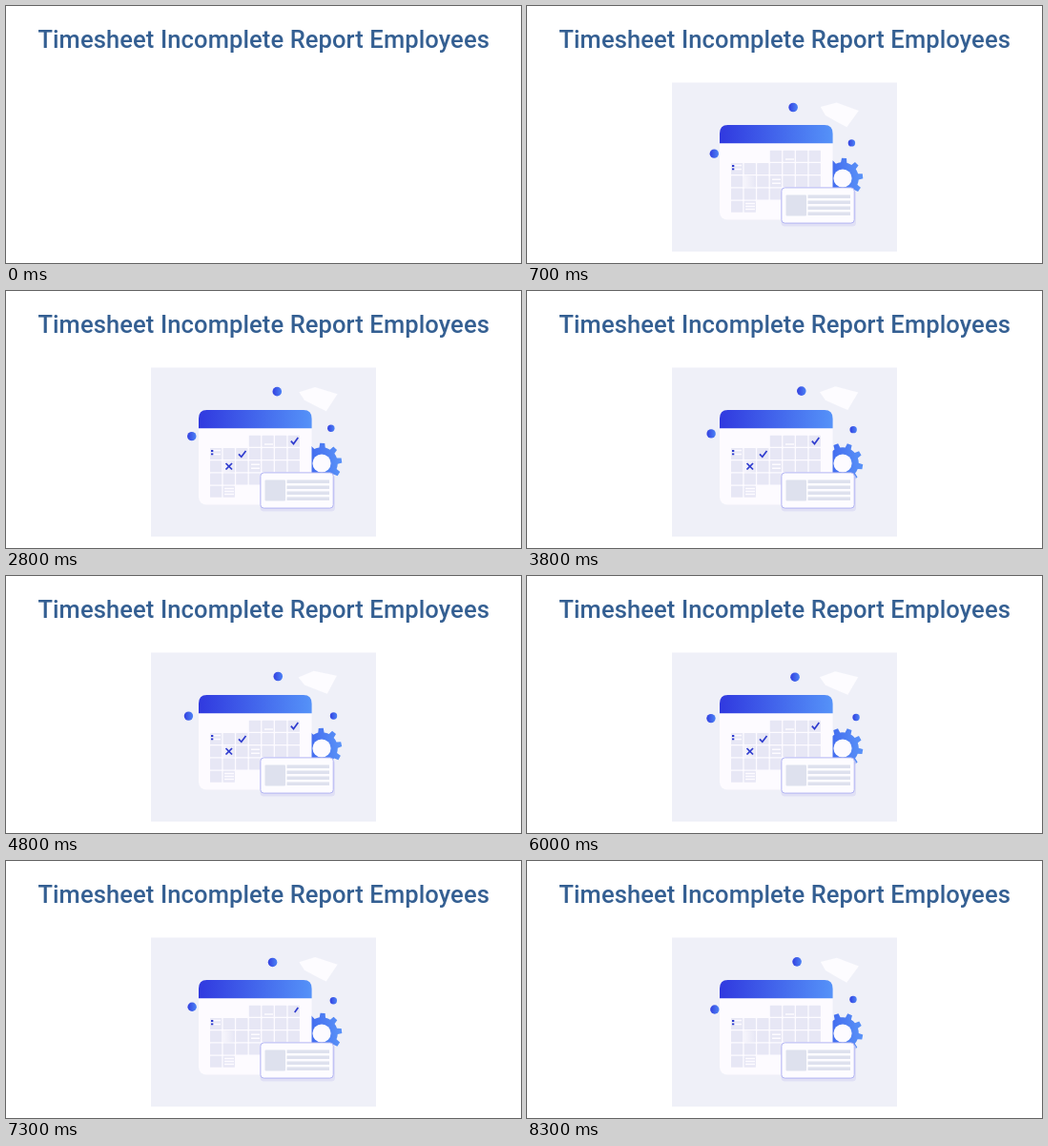
Write an HTML page that moves like this. It is 540 px wide and 270 px high and loops after 8400 ms.

```html
<!DOCTYPE html>
<html lang="en">
<head>
<meta charset="utf-8">
<title>Timesheet Incomplete Report Employees</title>
<style>
  html, body { margin: 0; width: 100%; height: 100%; overflow: hidden; background: #fff; }
  svg { display: block; width: 540px; height: 270px; }
  .title { font: 500 25.5px Roboto, "Open Sans", sans-serif; letter-spacing: .11px; fill: #345f92; text-anchor: middle; }
  .mark path { fill: none; stroke: #2f3ccf; stroke-width: 1.7; stroke-dasharray: 1 2; }
</style>
</head>
<body>
<svg viewBox="0 0 540 270">
  <defs>
    <linearGradient id="bar"><stop stop-color="#3039df"/><stop offset="1" stop-color="#5592f8"/></linearGradient>
    <linearGradient id="ball"><stop stop-color="#3340e0"/><stop offset="1" stop-color="#4d83f5"/></linearGradient>
    <linearGradient id="steel" gradientUnits="userSpaceOnUse" x1="314" x2="352" y1="0" y2="0">
      <stop stop-color="#3f66ed"/><stop offset="1" stop-color="#5a93f8"/>
    </linearGradient>
    <linearGradient id="fade"><stop stop-color="#f6f5fc"/><stop offset="1" stop-color="#e7e7f5"/></linearGradient>
  </defs>
  <text class="title" x="270.2" y="43.5">Timesheet Incomplete Report Employees</text>
  <g id="scene">
    <rect x="152" y="80.5" width="236" height="177.5" fill="#eff0f8"/>
    <path id="plane" d="M308 106L325 102L348 111L335 128L327 123.5L313 115Z" fill="#fdfcff"/>
    <g fill="url(#ball)">
      <circle id="top" r="4.8"/>
      <circle id="left" r="4.7"/>
      <circle id="right" r="3.7"/>
    </g>
    <path id="gear" fill="url(#steel)"/>
    <circle cx="331" cy="181" r="9.6" fill="#fdfbff"/>

    <rect x="202" y="126" width="118.5" height="98.5" rx="8" fill="#fdfbff"/>
    <path d="M202 144.2V134Q202 125 210.5 125H312Q320.6 125 320.6 134V144.2Z" fill="url(#bar)"/>
    <g id="cells" fill="#e7e7f5"></g>
    <rect x="227.6" y="178.3" width="12.3" height="12" fill="url(#fade)"/>
    <path d="M271 161H280M217 167.5H225M217 171.5H225M257 182.3H266M257 186.3H266M229 207.5H239M229 210.5H239M229 213.5H239" stroke="#fdfbff" stroke-width="1.5"/>
    <path d="M215 168H217.3M215 171.3H217.3" stroke="#2f3ccf" stroke-width="1.8"/>
    <g class="mark"><path pathLength="1" d="M244 171.3L246.8 174.3L251.5 168"/></g>
    <g class="mark">
      <path pathLength="1" d="M230.5 181L237 187.5"/>
      <path pathLength="1" d="M237 181L230.5 187.5"/>
    </g>
    <g class="mark"><path pathLength="1" d="M298.8 157.6L301.5 160.6L306.3 154.1"/></g>

    <rect x="266.5" y="193" width="78.5" height="38.5" rx="4" fill="#dcdcf6" opacity=".8"/>
    <rect x="266.9" y="190.9" width="76.3" height="37.2" rx="3.5" fill="#fdfcff" stroke="#b2b4f3"/>
    <rect x="271.5" y="198.5" width="21.5" height="22" rx="1" fill="#dee1ee"/>
    <path d="M294.5 200.3H339M294.5 206.3H339M294.5 212.3H339M294.5 218.3H339" stroke="#dee1ee" stroke-width="3.6"/>
  </g>
</svg>
<script>
const LOOP = 8400, STEP = 100;
const $ = id => document.getElementById(id);
const clamp = v => Math.min(1, Math.max(0, v));
const mix = (a, b, u) => a + (b - a) * u;

// Triangle wave: 0 at `low` seconds, 1 half a period later.
function sway(t, low, half) {
  const p = (((t - low) / half) % 2 + 2) % 2;
  return p < 1 ? p : 2 - p;
}

// Built at an angle rather than rotated, so the gradient stays level.
function gearPath(cx, cy, teeth, inner, outer, degrees) {
  const pitch = 2 * Math.PI / teeth;
  const turn = degrees * Math.PI / 180;
  const corners = [[-.27, inner], [-.17, outer], [.17, outer], [.27, inner], [.5, inner]];
  const points = [];
  for (let i = 0; i < teeth; i++) {
    for (const [k, r] of corners) {
      const a = (i + k) * pitch + turn;
      points.push(`${(cx + r * Math.sin(a)).toFixed(2)} ${(cy - r * Math.cos(a)).toFixed(2)}`);
    }
  }
  return `M${points.join('L')}Z`;
}

// First and last column of each calendar week.
[[3, 6], [0, 6], [0, 6], [0, 6], [0, 1]].forEach(([from, to], row) => {
  for (let col = from; col <= to; col++) {
    const cell = document.createElementNS('http://www.w3.org/2000/svg', 'rect');
    const box = { x: 214 + col * 13.6, y: 151.8 + row * 13.25, width: 12.3, height: 12, rx: .6 };
    for (const key in box) cell.setAttribute(key, box[key]);
    $('cells').append(cell);
  }
});

const balls = [
  { el: $('top'), low: 1.02, half: 2.92, from: [278, 106.7], to: [288.3, 105] },
  { el: $('left'), low: 4.95, half: 3.65, from: [191.2, 146.7], to: [197.3, 156.8] },
  { el: $('right'), low: 1.6, half: 4.38, from: [339.2, 142.7], to: [345.1, 148.6] }
];
// Seconds: drawing starts and ends, erasing starts and ends.
const markTimes = [[.9, 1.4, 6.2, 6.7], [1.5, 2, 6.5, 7], [2.1, 2.6, 7, 7.6]];
const marks = [...document.querySelectorAll('.mark')];

function render(ms) {
  const t = ms / 1000;
  $('scene').style.visibility = ms < STEP ? 'hidden' : 'visible';

  for (const { el, low, half, from, to } of balls) {
    const u = sway(t, low, half);
    el.setAttribute('cx', mix(from[0], to[0], u));
    el.setAttribute('cy', mix(from[1], to[1], u));
  }

  const lift = 1 - sway(t, 4.95, 3.65);
  $('plane').setAttribute('transform', `translate(${-lift} ${-2 * lift}) rotate(${-10 * lift} 322 110)`);
  $('gear').setAttribute('d', gearPath(331, 181, 9, 16.8, 21.3, 2 + 18 * (t - 2.8)));

  marks.forEach((mark, i) => {
    const [a, b, c, d] = markTimes[i];
    mark.style.strokeDashoffset = 1 - clamp((t - a) / (b - a)) - clamp((t - c) / (d - c));
  });
}

function tick() {
  render(Math.floor(performance.now() % LOOP / STEP) * STEP);
  requestAnimationFrame(tick);
}
tick();
</script>
</body>
</html>
```
